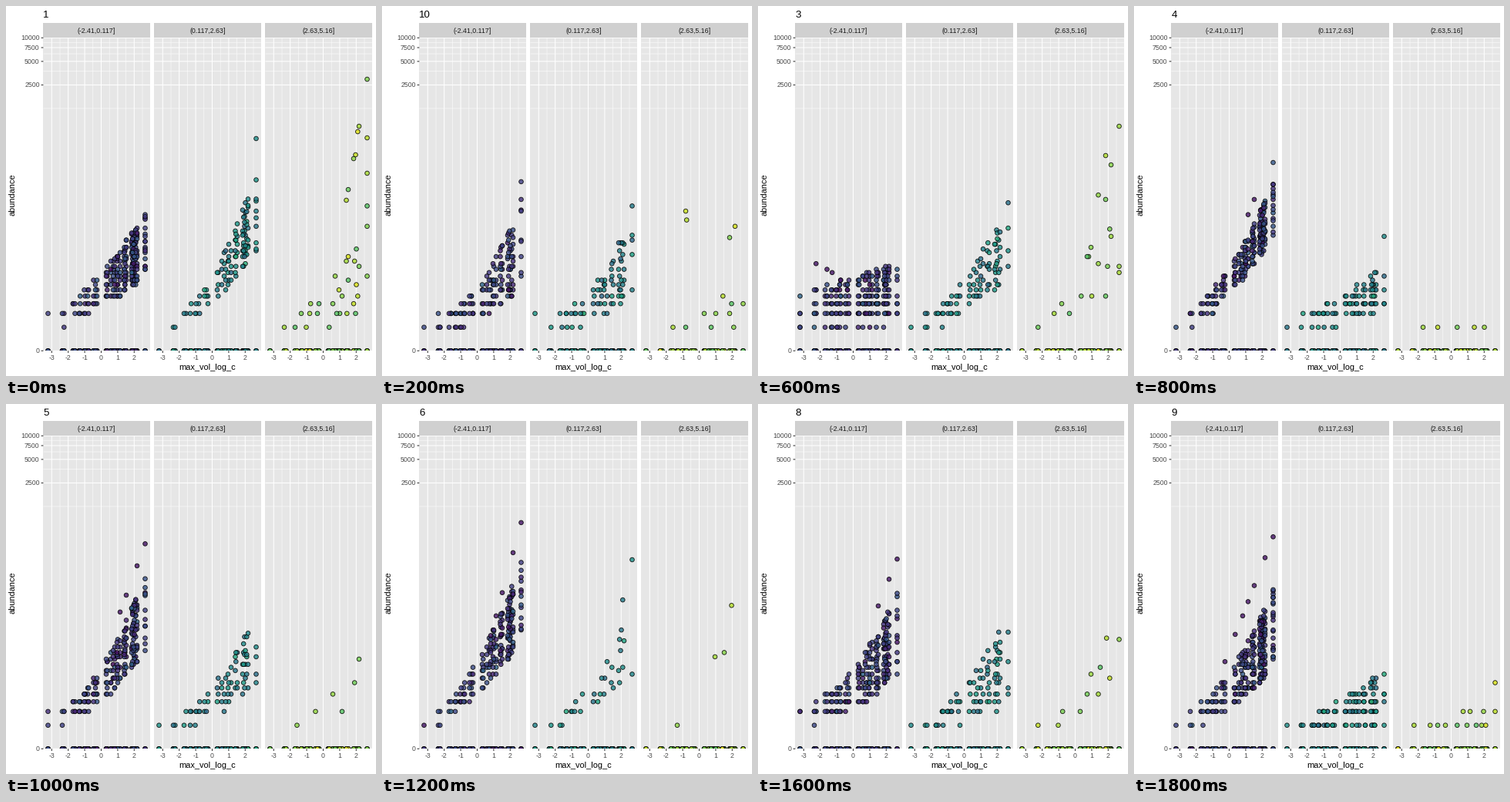
A matplotlib script that plays this animation: 480 by 480 pixels, repeating every 2000 ms.

```python
import numpy as np
import matplotlib.pyplot as plt
from matplotlib.animation import FuncAnimation
from matplotlib.patches import Rectangle

SIZE, PX = 480, 0.72
plt.rcParams["font.family"] = "Liberation Sans"

# Stage layout in pixels
LEFT, WIDTH, SHIFT = 48.4, 138.4, 144
TOP, BASE, STRIP = 41.3, 447.3, 22.4
X0, UNIT = 123.5, 21.4
LOG = (BASE - TOP) / np.log1p(10000)
MAJOR = (0, 2500, 5000, 7500, 10000)

# Clusters of trait values, as x positions in the first panel
CLUSTERS = ((54.5,), (73, 75.3), (87, 89.5), (95, 96.2),
            (101.5, 102.6, 106, 107.2), (113.5, 116, 118), (130, 131.3),
            (136, 139, 141), (144, 145, 148), (153.5, 154.3, 156),
            (163, 164.2, 165.5, 166.5, 168.3, 170), (180.5,))
TRAITS = np.concatenate(CLUSTERS)
U = (TRAITS - TRAITS[0]) / np.ptp(TRAITS)
# Mean, spread and limits of the fill tone in each panel
TONES = ((0.19, 0.06, 0.03, 0.33), (0.48, 0.07, 0.34, 0.66),
         (0.84, 0.07, 0.74, 0.98))

viridis = plt.get_cmap("viridis")
scenes = {}


def to_y(count):
    return BASE - LOG * np.log1p(count)


def snap(y):
    """Move a height to the nearest whole count."""
    return to_y(np.maximum(1, np.round(np.expm1((BASE - y) / LOG))))


def band(rng, n, left, right, low, bend, skew):
    """n points between two curves, denser to the right for a high skew."""
    share = np.exp(skew * U)
    want = n * share / share.sum()
    picks = np.searchsorted(np.cumsum(want), np.arange(n) + 0.5)
    picks = np.minimum(picks, len(U) - 1)
    curve = U[picks] ** bend
    top = left + (right - left) * curve
    bottom = np.maximum(to_y(1) + (low - to_y(1)) * curve, top)
    mix = (np.arange(n) * 0.618 + rng.uniform(-0.1, 0.1, n)) % 1
    points = np.column_stack([TRAITS[picks], snap(top + (bottom - top) * mix)])
    return rng.permutation(points)


def panel(k, rng, shape, points=(), crest=None):
    zeros = rng.permutation(np.repeat(TRAITS, 3))
    rows = [(x, BASE) for x in zeros]
    if shape:
        rows += [tuple(p) for p in band(rng, *shape)]
    for x, y in points:
        rows.append((TRAITS[np.argmin(abs(TRAITS - x))], snap(y)))
    dark = 0
    if crest:
        x1, y1, x2, y2 = crest
        for x in (c[-1] for c in CLUSTERS if x1 <= c[-1] <= x2):
            rows.append((x, snap(np.interp(x, (x1, x2), (y1, y2)))))
            dark += 1
    xy = np.array(rows) + (k * SHIFT, 0)
    mean, dev, lo, hi = TONES[k]
    tones = np.clip(rng.normal(mean, dev, len(xy)), lo, hi)
    tones[len(xy) - dark:] = 0.06
    colors = viridis(tones)
    colors[:, 3] = 0.82
    return xy, colors


def scene(name, *parts):
    rng = np.random.default_rng(int(name) + 40)
    scenes[name] = [panel(k, rng, *part) for k, part in enumerate(parts)]


# Each shape: count, top left, top right, bottom right, bend, skew
scene("1",
      [(215, 395, 265, 350, 1.6, 3)],
      [(105, 416, 217, 320, 1.8, 3), [(180, 172)]],
      [(28, 416, 250, 399, 2, 1.6),
       [(180, 95), (180, 171), (170, 156), (168, 163), (165, 193), (163, 198),
        (180, 217), (156, 238), (153, 252), (180, 286)]])
scene("10",
      [(140, 402, 240, 365, 2.5, 1.8), [(180, 228)]],
      [(72, 405, 258, 375, 2.5, 2)],
      [(10, 416, 360, 416, 1.5, 2),
       [(106, 266), (107, 278), (170, 286), (163, 301)]])
scene("2",
      [(180, 395, 258, 365, 2, 1.8)],
      [(90, 412, 235, 345, 1.8, 2)],
      [(14, 416, 250, 380, 2, 1.6), [(180, 190), (170, 215)]])
scene("3",
      [(200, 365, 332, 405, 1.5, 0.5)],
      [(85, 408, 255, 355, 1.7, 1.1)],
      [(12, 416, 215, 385, 2, 1),
       [(180, 156), (163, 194), (170, 206), (153, 245), (163, 251),
        (170, 299), (144, 313), (139, 325), (180, 338)]],)
scenes["3"][0] = panel(0, np.random.default_rng(43),
                       (200, 365, 332, 405, 1.5, 0.5), (), (73, 331, 108, 356))
scene("4",
      [(208, 402, 228, 300, 1.7, 2.4), [(180, 203)], (148, 271, 156, 251)],
      [(78, 410, 335, 395, 1.4, 1.5), [(180, 299)]],
      [(5, 416, 416, 416, 1, 0)])
scene("5",
      [(195, 400, 222, 325, 1.8, 2), (), (148, 270, 181, 180)],
      [(70, 412, 265, 365, 2, 1.6)],
      [(6, 416, 310, 400, 2, 1)])
scene("6",
      [(182, 412, 205, 310, 1.6, 2.4), (), (139, 308, 181, 152)],
      [(30, 416, 260, 350, 2, 0.5), [(180, 202), (168, 254)]],
      [None, [(165, 261), (156, 322), (144, 328), (95, 416)]])
scene("7",
      [(170, 380, 255, 385, 2.3, 0.8), [(170, 219), (180, 231)],
       (54, 322, 118, 346)],
      [(50, 416, 220, 395, 2.2, 1.7),
       [(170, 132), (168, 208), (180, 207), (156, 225)]],
      [(9, 416, 345, 416, 1.5, 0.8),
       [(170, 170), (168, 181), (165, 203), (168, 194), (170, 247),
        (165, 260), (144, 325)]])
scene("8",
      [(205, 392, 245, 355, 1.8, 1.7), (), (156, 262, 181, 200)],
      [(80, 412, 270, 390, 1.8, 1.5)],
      [(11, 416, 265, 410, 2, 1.2)])
scene("9",
      [(250, 402, 240, 352, 1.8, 3), (), (118, 334, 181, 171)],
      [(100, 414, 345, 416, 1.5, 1.5)],
      [(13, 416, 397, 416, 1, 1.2), [(180, 361)]])

fig = plt.figure(figsize=(SIZE / 100, SIZE / 100), dpi=100, facecolor="white")
ax = fig.add_axes([0, 0, 1, 1])
ax.set(xlim=(0, SIZE), ylim=(SIZE, 0))
ax.axis("off")


def line(xs, ys, width, color="white", clip=None):
    item, = ax.plot(xs, ys, color=color, lw=width * PX, snap=False,
                    solid_capstyle="butt")
    if clip is not None:
        item.set_clip_path(clip)


def text(x, y, s, size, color="black", **kw):
    return ax.text(x, y, s, fontsize=size * PX, color=color, **kw)


def draw_panel(k, name):
    left = LEFT + k * SHIFT
    right = left + WIDTH
    ax.add_patch(Rectangle((left, STRIP), WIDTH, TOP - STRIP, fc="#D0D0D0",
                           lw=0))
    box = ax.add_patch(Rectangle((left, TOP), WIDTH, BASE - TOP,
                                 fc="#E6E6E6", lw=0))
    text(left + WIDTH / 2, 35, name, 8.8, "#1A1A1A", ha="center")

    for count in range(1250, 10000, 2500):
        line([left, right], [to_y(count)] * 2, 0.53, clip=box)
    for v in np.arange(-2.5, 3):
        line([X0 + k * SHIFT + v * UNIT] * 2, [TOP, BASE], 0.53, clip=box)
    for count in MAJOR:
        line([left, right], [to_y(count)] * 2, 1.07, clip=box)
    for v in range(-3, 3):
        x = X0 + k * SHIFT + v * UNIT
        line([x, x], [TOP, BASE], 1.07, clip=box)
        line([x, x], [BASE, BASE + 2.75], 1.07, "#333333")
        text(x, 459, str(v), 8.8, "#4D4D4D", ha="center")

    dots = ax.scatter([], [], s=(5.6 * PX) ** 2, linewidths=0.9 * PX,
                      edgecolors=(0, 0, 0, 0.85), zorder=3)
    dots.set_clip_path(box)
    return dots


names = ("(-2.41,0.117]", "(0.117,2.63]", "(2.63,5.16]")
layers = [draw_panel(k, name) for k, name in enumerate(names)]

for count in MAJOR:
    y = to_y(count)
    line([LEFT - 2.75, LEFT], [y, y], 1.07, "#333333")
    text(43.6, y + 3.1, str(count), 8.8, "#4D4D4D", ha="right")

text(261.5, 472, "max_vol_log_c", 11, ha="center")
text(13.6, 244.5, "abundance", 11, rotation=90, ha="right", va="center")
title = text(LEFT, 15.2, "", 13.2)
order = list(scenes)


def update(i):
    title.set_text(order[i])
    for dots, (xy, colors) in zip(layers, scenes[order[i]]):
        dots.set_offsets(xy)
        dots.set_facecolors(colors)
    return [title, *layers]


anim = FuncAnimation(fig, update, frames=len(order), interval=200,
                     repeat=True, repeat_delay=0)
plt.show()
```
